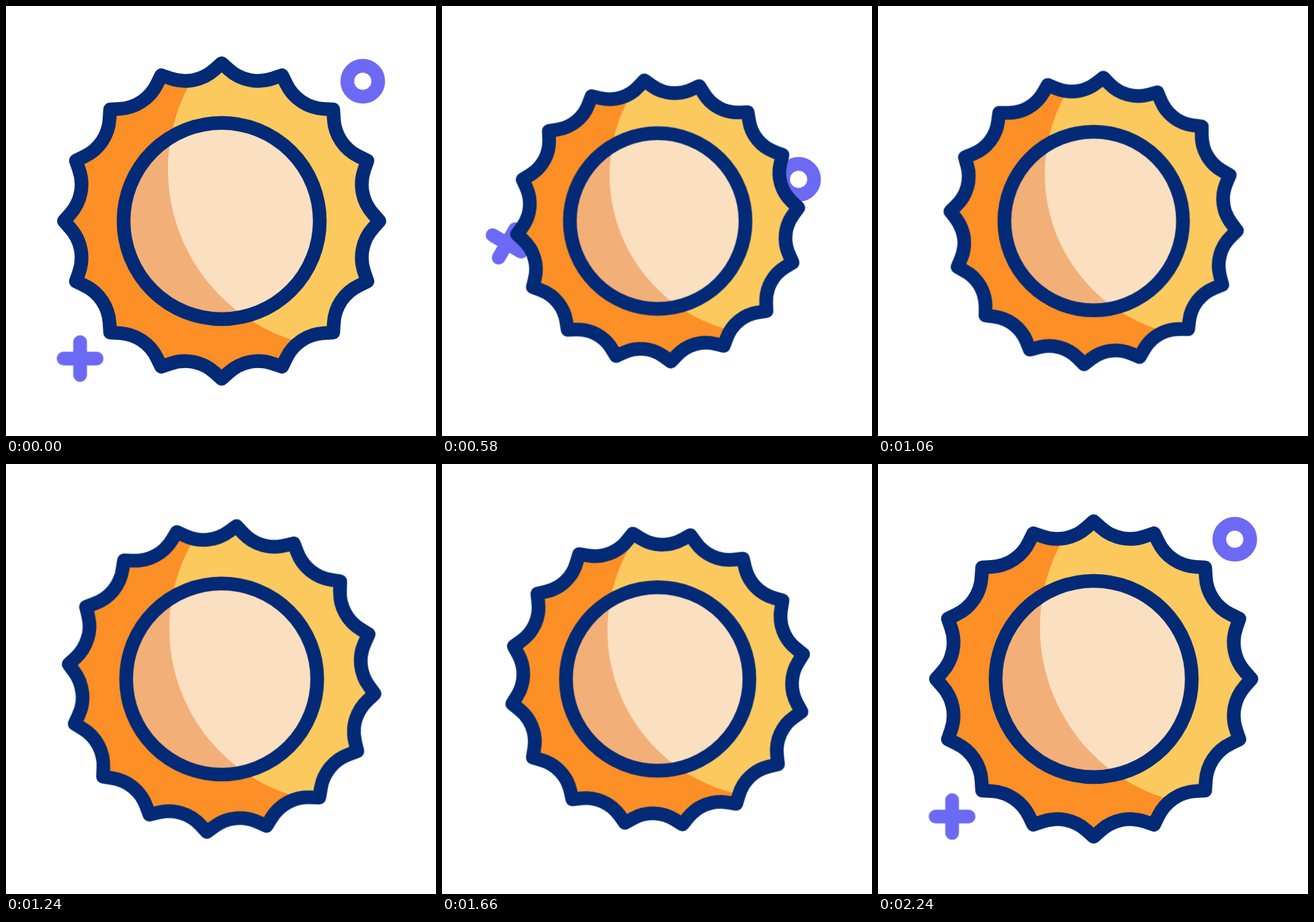
An HTML page that plays this animation: 640 by 640 pixels, repeating every 2.4 s.

```html
<!DOCTYPE html>
<html lang="en">
<head>
<meta charset="utf-8">
<title>Spinning sun</title>
<style>
  html, body { margin: 0; width: 100%; height: 100%; overflow: hidden; background: #fff; }
  svg { display: block; width: 100vw; height: 100vh; }

  .sun, .spin, .drift, .turn {
    animation: 2400ms cubic-bezier(.3333, 0, .6667, 1) infinite;
  }
  .sun { animation-name: pulse; }
  .spin { animation-name: spin; }
  .drift { animation-name: drift; offset-rotate: 0deg; }
  .turn { animation-name: turn; }
  .plus { offset-path: path("M110.3 524.7C73 397 72 354 173 244"); }
  .ring { offset-path: path("M531 112C561 190 541 275 471 355"); }

  .line { fill: none; stroke: #032a76; }
  .accent { fill: none; stroke: #6c6af4; stroke-linecap: round; }
  .line, .accent { stroke-width: 20.4; stroke-linejoin: round; }
  #gear, #disc { vector-effect: non-scaling-stroke; }

  @keyframes pulse {
    0%, 8.3333%, 58.3333%, 91.6667%, 100% { transform: scale(1); }
    33.3333% { transform: scale(.85); }
    75% { transform: scale(.91); }
  }
  @keyframes spin {
    0%, 8.3333% { transform: rotate(0deg); }
    91.6667%, 100% { transform: rotate(180deg); }
  }
  /* The accents slip behind the sun, wait there and come back. */
  @keyframes drift {
    0%, 8.3333%, 91.6667%, 100% { offset-distance: 0%; }
    37.5%, 62.5% { offset-distance: 100%; }
  }
  @keyframes turn {
    0%, 8.3333%, 91.6667%, 100% { transform: rotate(0deg); }
    37.5%, 62.5% { transform: rotate(53deg); }
  }
</style>
</head>
<body>
<svg viewBox="0 0 640 640">
  <defs>
    <path id="gear"/>
    <circle id="disc" r="146"/>
    <clipPath id="lit"><circle cx="187" cy="-77" r="267"/></clipPath>
  </defs>

  <g class="drift plus"><path class="accent turn" d="M-24.6 0H24.6M0-24.6V24.6"/></g>
  <g class="drift ring"><circle class="accent" r="23"/></g>

  <g transform="translate(321 320)">
    <g class="sun">
      <use class="spin" href="#gear" fill="#fc8f25"/>
      <g clip-path="url(#lit)"><use class="spin" href="#gear" fill="#fbc95e"/></g>
      <use class="spin line" href="#gear"/>
      <use href="#disc" fill="#f3af78"/>
      <g clip-path="url(#lit)"><use href="#disc" fill="#fbdfc1"/></g>
      <use class="line" href="#disc"/>
    </g>
  </g>
</svg>
<script>
  const TEETH = 16, STEP = 360 / TEETH;

  function polar(radius, degrees) {
    const a = degrees * Math.PI / 180;
    return (radius * Math.sin(a)).toFixed(2) + ' ' + (-radius * Math.cos(a)).toFixed(2);
  }

  // Each tooth has short straight flanks joined by a concave arc.
  let d = '';
  for (let i = 0; i < TEETH; i++) {
    const a = i * STEP;
    d += (i ? 'L' : 'M') + polar(234.8, a) + 'L' + polar(225.7, a + 2.69) +
      'A65.7 65.7 0 0 0 ' + polar(225.7, a + STEP - 2.69);
  }
  document.getElementById('gear').setAttribute('d', d + 'Z');
</script>
</body>
</html>
```
